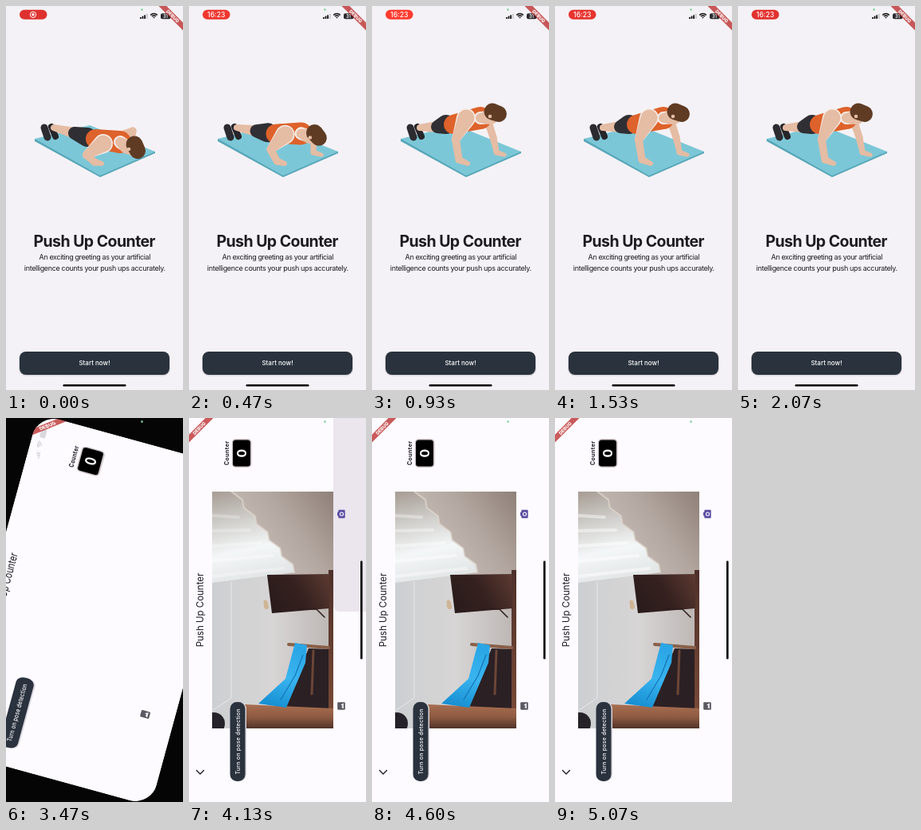
Recreate the animation shown at these times as an HTML page with a canvas. Size 222 by 480 pixels, loop 5.14 s.

```html
<!DOCTYPE html>
<html lang="en">
<head>
<meta charset="utf-8">
<title>Push Up Counter</title>
<style>
  html, body { margin: 0; width: 100%; height: 100%; overflow: hidden; background: #fdfbff; }
  canvas { display: block; width: 222px; height: 480px; }
</style>
</head>
<body>
<canvas id="stage"></canvas>
<script>
const W = 222, H = 480, LOOP = 5140;
const canvas = document.getElementById('stage');
const ctx = canvas.getContext('2d');
const dpr = window.devicePixelRatio || 1;
canvas.width = W * dpr;
canvas.height = H * dpr;

const INK = '#1d1b20', NAVY = '#2a323e', PAPER = '#fdfbff', VIOLET = '#5d4fa3';
const SKIN = '#e5bca4', HAIR = '#5f3b24', ORANGE = '#de622b', DARK = '#302f34', TRIM = '#f6eee8';

const clamp = v => Math.max(0, Math.min(1, v));
const mix = (a, b, k) => a + (b - a) * k;
const span = (t, a, b) => clamp((t - a) / (b - a));
const smooth = v => v * v * (3 - 2 * v);
const easeOut = (v, power) => 1 - (1 - v) ** power;
const wave = (t, period) => 0.5 - 0.5 * Math.cos(t / period * 2 * Math.PI);

function text(str, x, y, size, weight, color, spacing = 0) {
  ctx.font = `${weight} ${size}px Inter, "Liberation Sans", sans-serif`;
  ctx.letterSpacing = spacing + 'px';
  ctx.textAlign = 'center';
  ctx.fillStyle = color;
  ctx.fillText(str, x + spacing / 2, y);
}

function box(x, y, w, h, r, color) {
  ctx.beginPath();
  ctx.roundRect(x, y, w, h, r);
  ctx.fillStyle = color;
  ctx.fill();
}

function disc(x, y, r, color) {
  ctx.beginPath();
  ctx.arc(x, y, r, 0, 7);
  ctx.fillStyle = color;
  ctx.fill();
}

function arc(x, y, r, from, to, width, color) {
  ctx.beginPath();
  ctx.arc(x, y, r, from, to);
  ctx.lineWidth = width;
  ctx.lineCap = 'butt';
  ctx.strokeStyle = color;
  ctx.stroke();
}

function trace(p) {
  ctx.beginPath();
  for (let i = 0; i < p.length; i += 2) ctx.lineTo(p[i], p[i + 1]);
}

function poly(color, ...p) {
  trace(p);
  ctx.fillStyle = color;
  ctx.fill();
}

function line(color, width, ...p) {
  trace(p);
  ctx.lineWidth = width;
  ctx.strokeStyle = color;
  ctx.lineCap = ctx.lineJoin = 'round';
  ctx.stroke();
}

function grad(x0, y0, x1, y1, ...colors) {
  const g = ctx.createLinearGradient(x0, y0, x1, y1);
  colors.forEach((c, i) => g.addColorStop(i / (colors.length - 1), c));
  return g;
}

// Body part: two circles joined by their outer tangents
function part(color, [ax, ay], ra, [bx, by], rb) {
  const dir = Math.atan2(by - ay, bx - ax);
  const off = Math.acos(Math.max(-1, Math.min(1, (ra - rb) / Math.hypot(bx - ax, by - ay))));
  ctx.beginPath();
  ctx.arc(ax, ay, ra, dir + off, dir - off + 2 * Math.PI);
  ctx.arc(bx, by, rb, dir - off, dir + off);
  ctx.fillStyle = color;
  ctx.fill();
}

function athlete(k) {
  // Joint between its lowered and raised place
  const joint = (x0, y0, x1, y1) => [mix(x0, x1, k), mix(y0, y1, k)];
  const knee = joint(86, 159, 82, 151), hip = joint(102, 164, 93, 148);
  const waist = joint(112, 166, 102, 148), chest = joint(143, 170, 136, 140);
  const shoulder = joint(122, 172, 118, 140), elbow = joint(101, 186, 105, 167);
  const hand = joint(111, 195, 109, 192), farElbow = joint(159, 156, 152, 164);
  const face = joint(152, 176, 149, 139), crown = joint(161, 173, 151, 132);
  const brow = joint(165, 181, 159, 135);

  poly('#56a6b8', 36, 166, 187, 182, 187, 184, 118, 214, 36, 169);
  poly('#7cc7d7', 36, 166, 105, 149, 187, 182, 118, 212);

  part(SKIN, joint(143, 162, 145, 143), 5, farElbow, 4.5);
  part(SKIN, farElbow, 4.5, [156, 182], 3.5);
  part(SKIN, [156, 183], 3.5, [166, 186], 2.5);

  part('#26252a', [57, 151], 4, [62, 163], 4);
  part(SKIN, [60, 152], 4, knee, 7);
  part('#2c2b30', [48, 152], 4.5, [52, 164], 4.5);
  part(DARK, knee, 8, hip, 12);
  part(ORANGE, waist, 12, chest, 14);

  part(TRIM, chest, 8, face, 8);
  part(SKIN, chest, 6, face, 9);
  part(TRIM, shoulder, 12, elbow, 5);
  part(SKIN, shoulder, 10.5, elbow, 5);
  part(SKIN, elbow, 5, hand, 4.5);
  part(SKIN, hand, 4.5, [120, 197], 3);
  part(HAIR, crown, 10.5, brow, 10);
  disc(...joint(154, 179, 148, 138), 2.3, SKIN);
}

function intro(t) {
  ctx.fillStyle = '#f4f2f6';
  ctx.fillRect(0, 0, W, H);
  // One push-up takes 610 ms, with a short rest at both ends
  athlete(smooth(span(wave(t, 610), 0.15, 0.85)));
  text('Push Up Counter', 111, 300.5, 19.5, 700, INK, -0.55);
  text('An exciting greeting as your artificial', 111.5, 317, 9, 400, INK, -0.4);
  text('intelligence counts your push ups accurately.', 111.5, 330.5, 9, 400, INK, -0.34);
  box(16, 432, 190, 30.5, 9, '#d5d3da');
  box(17, 432, 188, 29, 8, '#29323d');
  text('Start now!', 111, 449.3, 8, 500, '#fff');
}

function pictureIcon(x, y) {
  box(x - 4.8, y - 4.8, 9.6, 9.6, 1.2, '#5b5a62');
  poly(PAPER, x - 3.5, y + 2.8, x - 1.5, y + 0.3, x, y + 1.7, x + 1.4, y - 0.6, x + 3.5, y + 2.8);
}

function cameraIcon(x, y) {
  box(x - 5.2, y - 3.7, 10.4, 8.4, 1.2, VIOLET);
  box(x - 2.4, y - 5, 4.8, 2.5, 0.8, VIOLET);
  disc(x, y + 0.5, 2.6, PAPER);
  disc(x, y + 0.5, 1.6, VIOLET);
}

function controls(w, h, wide) {
  const [backX, headY, boxY, buttonY, iconY] = wide ? [37, 14, 66, 61, h - 31] : [11, 39, 90, 85.5, h - 38];
  const cx = w - 44;
  line(INK, 1.4, backX + 2.5, headY - 4.5, backX - 2, headY, backX + 2.5, headY + 4.5);
  text('Push Up Counter', w / 2, headY + 4.2, 11.5, 400, INK);
  text('Counter', cx, boxY - 15.7, 7, 700, INK, 0.4);
  box(cx - 18, boxY - 12.3, 36, 25, 5, '#cfc6cb');
  box(cx - 16.5, boxY - 11, 33, 22, 3.5, '#000');
  text('0', cx, boxY + 5.8, 16, 700, '#fff');
  box(25.5, buttonY - 9, 100, 20, 9, '#d9d6dd');
  box(26, buttonY - 9.5, 99, 19, 8.5, NAVY);
  text('Turn on pose detection', 75.5, buttonY + 2.5, 7, 500, '#fff', 0.22);
  pictureIcon(w / 4, iconY);
  cameraIcon(w * 3 / 4, iconY);
}

function homeBar(w, h, len) {
  box((w - len) / 2, h - 7, len, 2.6, 1.3, '#000');
}

function banner(w) {
  ctx.save();
  ctx.translate(w, 0);
  ctx.rotate(Math.PI / 4);
  ctx.fillStyle = 'rgba(183,28,28,.72)';
  ctx.fillRect(-24, 14.6, 48, 7);
  text('DEBUG', 0, 20.2, 5.8, 800, '#fff');
  ctx.restore();
}

function statusBar(t, w, alpha) {
  const glow = wave(t, 1867), clock = span(t, 230, 430), x = w - 54;
  ctx.save();
  ctx.globalAlpha = alpha;
  box(17, 4.8, 34.5, 12, 6, `rgb(${mix(222, 255, glow)} ${mix(49, 59, glow)} 47)`);
  for (let i = 0; i < 4; i++) {
    const tall = 2 + i * 1.4;
    box(x + i * 2.6, 16 - tall, 1.8, tall, 0.5, i < 3 ? '#111' : '#c5c3c8');
  }
  for (let r = 1.2; r < 7; r += 2.4) arc(x + 17.5, 15.6, r, -Math.PI * 0.75, -Math.PI * 0.25, 1.5, '#111');
  box(x + 26, 9.3, 12.5, 7, 2, '#29282c');
  text('31', x + 32, 15, 5.5, 700, '#fff');
  ctx.globalAlpha = alpha * (1 - clock);
  arc(34, 10.8, 3.7, 0, 7, 1, '#fff');
  disc(34, 10.8, 1.8, '#fff');
  ctx.globalAlpha = alpha * clock;
  text('16:23', 34.2, 14, 8.6, 500, '#fff');
  ctx.restore();
}

// Camera view: flat shapes in screen coordinates
function room(t) {
  ctx.save();
  ctx.beginPath();
  ctx.rect(29, 92, 152, 296);
  ctx.clip();
  ctx.fillStyle = grad(29, 0, 181, 0, '#cccfd1', '#d7d5d5', '#bcb5b2');
  ctx.fillRect(29, 92, 152, 296);
  ctx.fillStyle = grad(70, 170, 181, 92, '#c9c0b9', '#b3a8a1', '#8f8078');
  ctx.fillRect(29, 92, 152, 103);

  // Bright sheets with a ragged edge
  const edge = [];
  for (let i = 0; i <= 10; i++) edge.push(mix(55, 134, i / 10) + (i % 2 ? 4 : -2), mix(92, 193, i / 10));
  poly(grad(45, 92, 70, 205, '#aaa098', '#d0cfcb', '#f4f7f8', '#e2e5e6'), 29, 92, ...edge, 29, 206);
  line('rgba(226,217,207,.7)', 2, ...edge);
  const shine = mix(0.25, 0.45, span(t, 4130, 5070));
  for (let i = 0; i < 5; i++) line(`rgba(255,255,255,${shine})`, 4, 29, 122 + i * 19, 62 + i * 14, 124 + i * 16);

  line('#e6e8ea', 1, 53, 205, 53, 350, 29, 366);
  ctx.fillStyle = grad(0, 190, 0, 388, '#4d302a', '#7d4c37');
  ctx.fillRect(175, 190, 6, 198);
  poly(grad(100, 240, 176, 196, '#281b1b', '#35211f', '#5c3a31'), 98, 196, 176, 195, 176, 238, 104, 244);
  line('#2c1d1c', 1.5, 136, 238, 160, 239, 170, 249);
  part('#cfb596', [96, 230], 2.5, [97, 236], 3);

  line('#8a6049', 4, 125, 283, 175, 287);
  poly('#2b2024', 150, 288, 175, 289, 175, 364, 118, 364);
  line('#6b4637', 3, 156, 291, 154, 345);
  poly(grad(0, 360, 0, 388, '#a56c4f', '#8d5a41', '#51332a'), 70, 358, 181, 363, 181, 388, 70, 388);
  poly(grad(130, 285, 105, 360, '#2aa6e6', '#39b4ef', '#178fd2'), 133, 281, 148, 284, 146, 306, 122, 362, 87, 357, 121, 326);
  line('#1476b6', 1.2, 143, 296, 133, 322, 115, 352);
  disc(31, 382, 14, '#252329');
  ctx.restore();
}

function splash(t) {
  ctx.save();
  ctx.globalAlpha = span(t, 3880, 3990) * (1 - span(t, 4130, 4330));
  box(181, -10, 60, 252, 8, '#ebe5ee');
  ctx.restore();
}

function portrait(t) {
  ctx.fillStyle = PAPER;
  ctx.fillRect(0, 0, W, H);
  controls(W, H, false);
}

function landscape(t) {
  const turn = easeOut(span(t, 3310, 3760), 4), turning = turn < 1;
  const w = mix(W, H, turn), h = mix(H, W, turn);
  ctx.fillStyle = turning ? '#050505' : PAPER;
  ctx.fillRect(0, 0, W, H);
  if (!turning) splash(t);
  if (t >= 4000) room(t);

  ctx.save();
  ctx.translate(W / 2, H / 2);
  ctx.rotate(-Math.PI / 2 * turn);
  ctx.translate(-w / 2, -h / 2);
  if (turning) {
    ctx.beginPath();
    ctx.roundRect(0, 0, w, h, 28 * Math.min(1, 6 * turn, 6 * (1 - turn)));
    ctx.clip();
    ctx.fillStyle = PAPER;
    ctx.fillRect(0, 0, w, h);
    statusBar(t, w, 1 - turn);
  }
  // The wide layout is stretched to the turning bounds
  ctx.scale(w / H, h / W);
  controls(H, W, true);
  if (!turning) homeBar(H, W, 123);
  banner(H);
  ctx.restore();
}

function draw(t) {
  ctx.setTransform(dpr, 0, 0, dpr, 0, 0);
  if (t > 3310) {
    landscape(t);
  } else {
    const enter = easeOut(span(t, 2250, 2720), 3);
    if (enter < 1) intro(t);
    ctx.save();
    ctx.translate(W * (1 - enter), 0);
    if (enter > 0) portrait(t);
    ctx.restore();
    statusBar(t, W, 1);
    homeBar(W, H, 79);
    banner(W);
  }
  disc(170.5, 4.6, 1.3, '#7fd3a0');
}

const start = performance.now();
function tick() {
  draw((performance.now() - start) % LOOP);
  requestAnimationFrame(tick);
}
tick();
</script>
</body>
</html>
```
